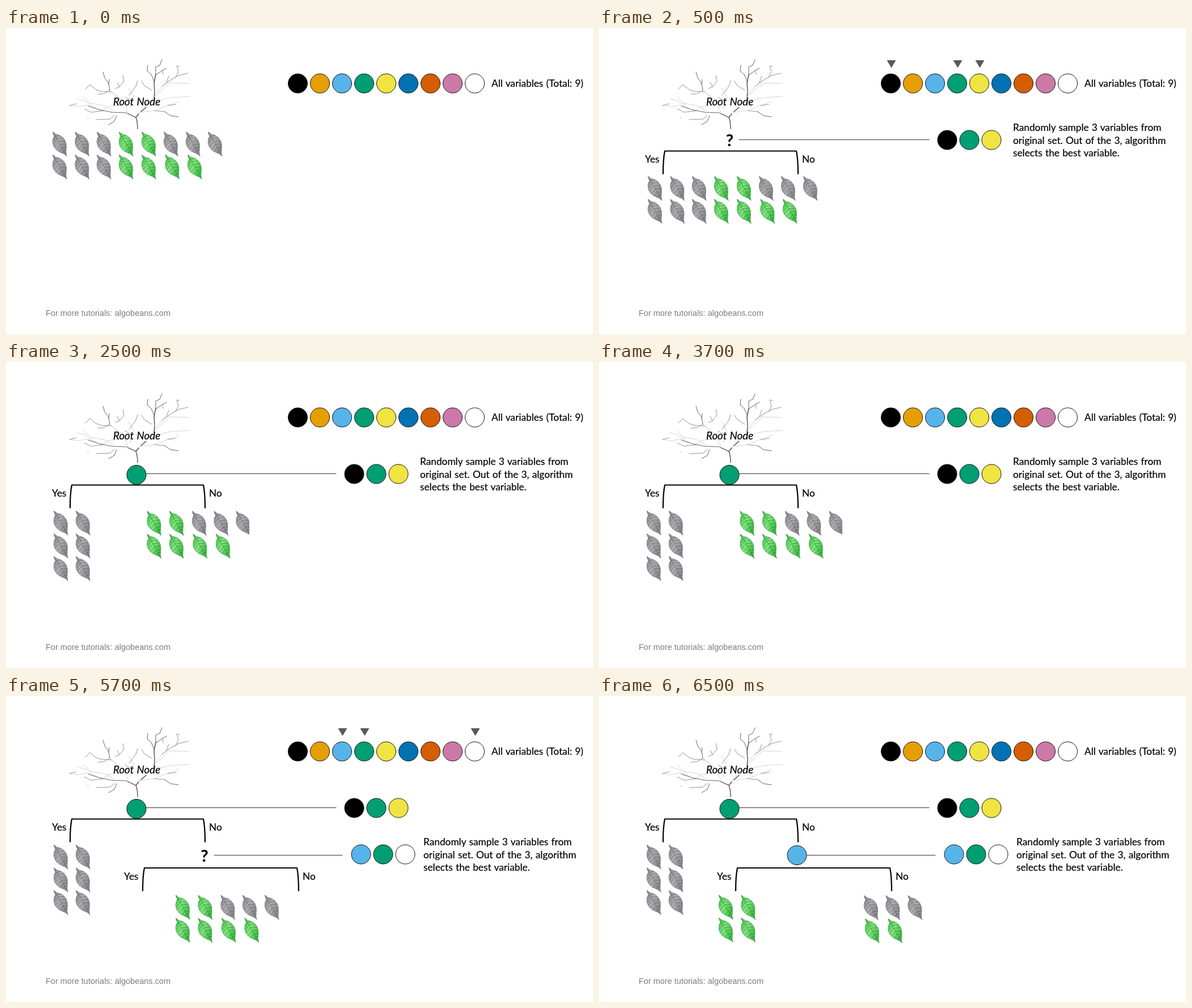
These frames come from a looping animation (1035 px wide and 541 px high, 8000 ms). An HTML page:

```html
<!DOCTYPE html>
<html lang="en">
<head>
<meta charset="utf-8">
<title>Random variable selection</title>
<style>
html, body { margin: 0; width: 100%; height: 100%; overflow: hidden; background: #fff; }
svg { display: block; width: 1035px; height: 541px; }
text { font: 17.3px Lato, "Open Sans", sans-serif; word-spacing: .8px; fill: #000; stroke: #000; stroke-width: .2; }
.root { font-size: 18.8px; font-style: italic; }
.ask { font-size: 29px; font-weight: 700; text-anchor: middle; }
.foot { font: 14.5px "Liberation Sans", Arial, sans-serif; word-spacing: 0; fill: #7c7c7c; stroke: none; }
.tree path, .bracket, .link, .rib { fill: none; stroke-linecap: round; stroke-linejoin: round; }
.bracket { stroke: #000; stroke-width: 2.2; stroke-linecap: butt; }
.link { stroke: #333; }
</style>
</head>
<body>
<svg viewBox="0 0 1035 541">
  <defs>
    <linearGradient id="gray" x2="1" y2=".5">
      <stop stop-color="#8e8d92"/><stop offset=".5" stop-color="#aeadb2"/><stop offset="1" stop-color="#89888d"/>
    </linearGradient>
    <linearGradient id="green" x2="1" y2=".5">
      <stop stop-color="#4fc950"/><stop offset=".5" stop-color="#83e581"/><stop offset="1" stop-color="#3fbb45"/>
    </linearGradient>
    <path id="blade" d="M.5.5C3 1 4 4 7 4.5C15 6 21 11 23.500 19C26 28 22 34 25 43C20 37 13 38 6 31C-1 24-1 14 3 8Q1 4 .5.5Z"/>
    <path id="rib" class="rib" d="M.5.5Q6 9 11 18T25 43M5 8L13 7M8 12L18 11M11 17L22 16M14 22L24 22M17 28L24 28M20 33L24 33M5 8L2 14M8 12L2 20M11 17L3 26M14 22L6 31M17 28L11 35M20 33L17 37"/>
    <clipPath id="crop"><path d="M0 0H429V541H0Z"/></clipPath>
  </defs>
  <g class="tree">
    <path stroke="#d4d4d4" d="M112 137L128 139 145 136 160 142M125 125L139 129 152 136M137 121L149 133 172 137 190 146M232 152L249 133 290 123 324 121M262 121L289 97 322 98M219 143L225 121 216 106M285 137L305 130M166 149L180 139 201 136M186 113L205 128 215 149M183 110L205 128M238 149L262 146 285 137M262 119L275 103 290 92M229 158L238 148"/>
    <path stroke="#888" stroke-width=".9" d="M112 137L124 134M138 143L150 149 172 146M140 108L148 100 159 109 168 112 186 113M162 117L173 116 183 110M193 107L200 104 208 94 206 84M196 96L200 104M217 119L229 103 232 93M239 94L244 102 257 110M275 103L290 92 304 84 321 80M299 88L304 77 301 67 306 68M283 96L287 85M262 146L280 148M285 137L300 135M277 82L276 75M210 122L222 129M144 159L145 159M159 162L184 161 191 154"/>
    <path stroke="#666" d="M145 138L163 144 172 146 187 149 213 150M181 171L191 165 195 155M183 110L181 98 174 88 171 78M181 99L182 91M280 148L290 155 304 157M262 96L256 82 249 76 250 66M264 82L264 69 271 66 275 56M264 83L276 75 283 71"/>
    <path stroke="#444" stroke-width="1.3" d="M232 178Q232 165 229 158L214 151M238 148L247 140M229 158L234 152M261 125L262 112 261 97 264 82"/>
  </g>
  <text class="root" x="189" y="137">Root Node</text>
  <text x="856" y="104">All variables (Total: 9)</text>
  <text class="foot" x="70" y="508.500">For more tutorials: algobeans.com</text>
  <g id="vars"></g>
  <g id="scene"></g>
</svg>
<script>
const [black, orange, sky, teal, yellow, blue, rust, pink, white] =
  ['#000', '#e69f00', '#56b4e9', '#009e73', '#f0e442', '#0072b2', '#d55e00', '#cc79a7', '#fff'];
const palette = [black, orange, sky, teal, yellow, blue, rust, pink, white];
const $ = id => document.getElementById(id);

const dot = (x, y, fill) => `<circle cx="${x}" cy="${y}" r="17" fill="${fill}" stroke="#111"/>`;
const dots = (x, y, fills) => fills.map((f, i) => dot(x + 39 * i, y, f)).join('');
const label = (x, y, s, cls = '') => `<text class="${cls}" x="${x}" y="${y}">${s}</text>`;
const arrows = (...slots) => slots.map(i => `<path fill="#595959" d="M${507.5 + 39 * i} 57h16l-8 13.500z"/>`).join('');
const link = (x1, x2, y) => `<path class="link" d="M${x1} ${y}H${x2}"/>`;

const leaf = (x, y, c) => `<g transform="translate(${x} ${y})">
  <use href="#blade" fill="url(#${c})" stroke="${c === 'gray' ? '#6c6b70' : '#2f9637'}" stroke-width=".7"/>
  <use href="#rib" stroke="${c === 'gray' ? '#66656a' : '#2c8a34'}" stroke-width=".7"/></g>`;
const row = (y, xs, colors) => xs.map((x, i) => leaf(x, y, colors[i] === 'n' ? 'green' : 'gray')).join('');

const bracket = (x1, x2, y) => `<path class="bracket" d="M${x1} ${y + 41}Q${x1} ${y + 14} ${x1 + 3} ${y}H${x2 - 3}Q${x2} ${y + 14} ${x2} ${y + 41}"/>`;
const split = (x1, x2, y, yes) => bracket(x1, x2, y) + label(yes, y + 20.5, 'Yes') + label(x2 + 7, y + 20.5, 'No');
const note = (x, y) => ['Randomly sample 3 variables from', 'original set. Out of the 3, algorithm', 'selects the best variable.']
  .map((s, i) => label(x, y + 22.7 * i, s)).join('');

// Leaf groups: g = gray, n = green
const allLeaves = (x, y) => row(y, [0, 39.5, 78, 117, 157, 196, 235, 274].map(d => x + d), 'gggnnggg')
  + row(y + 40.5, [0, 39.5, 78, 117, 157, 198.5, 238].map(d => x + d), 'gggnnnn');
const noLeaves = (x, y) => row(y, [0, 39.5, 79.5, 118, 157].map(d => x + d), 'nnggg')
  + row(y + 40.5, [0, 39.5, 81, 121.5].map(d => x + d), 'nnnn');
const yesLeaves = [263, 303.5, 343.5].map(y => row(y, [84, 123], 'gg')).join('');

const first = link(247, 582, 197.5) + dots(614, 198, [black, teal, yellow]) + split(113, 351, 217.5, 81);
const second = first + dot(230, 199.5, teal) + yesLeaves + link(367, 593, 281.5)
  + dots(626, 280, [sky, teal, white]) + split(241, 516, 304, 208) + note(736, 264);

const scenes = [
  [0, allLeaves(82, 183.5)],
  [500, first + arrows(0, 3, 4) + label(230.5, 208.5, '?', 'ask') + note(730, 182) + allLeaves(86, 262)],
  [2500, first + dot(230, 199.5, teal) + note(730, 182) + yesLeaves
    + `<g clip-path="url(#crop)">${noLeaves(248.5, 263.5)}</g>`],
  [4500, second + arrows(2, 3, 8) + label(350, 292.5, '?', 'ask') + noLeaves(299, 352)],
  [6500, second + dot(349, 281.5, sky) + row(352, [211, 250.5], 'nn') + row(392, [211, 250.5], 'nn')
    + row(352.5, [467, 505.5, 544.5], 'ggg') + row(393.5, [469, 509.5], 'nn')]
];

$('vars').innerHTML = dots(514.5, 98, palette);

const start = performance.now();
let shown;
function draw(now) {
  const t = Math.max(0, now - start) % 8000;
  const [, scene] = scenes.findLast(([from]) => t >= from);
  if (scene !== shown) $('scene').innerHTML = shown = scene;
  requestAnimationFrame(draw);
}
draw(start);
</script>
</body>
</html>
```
